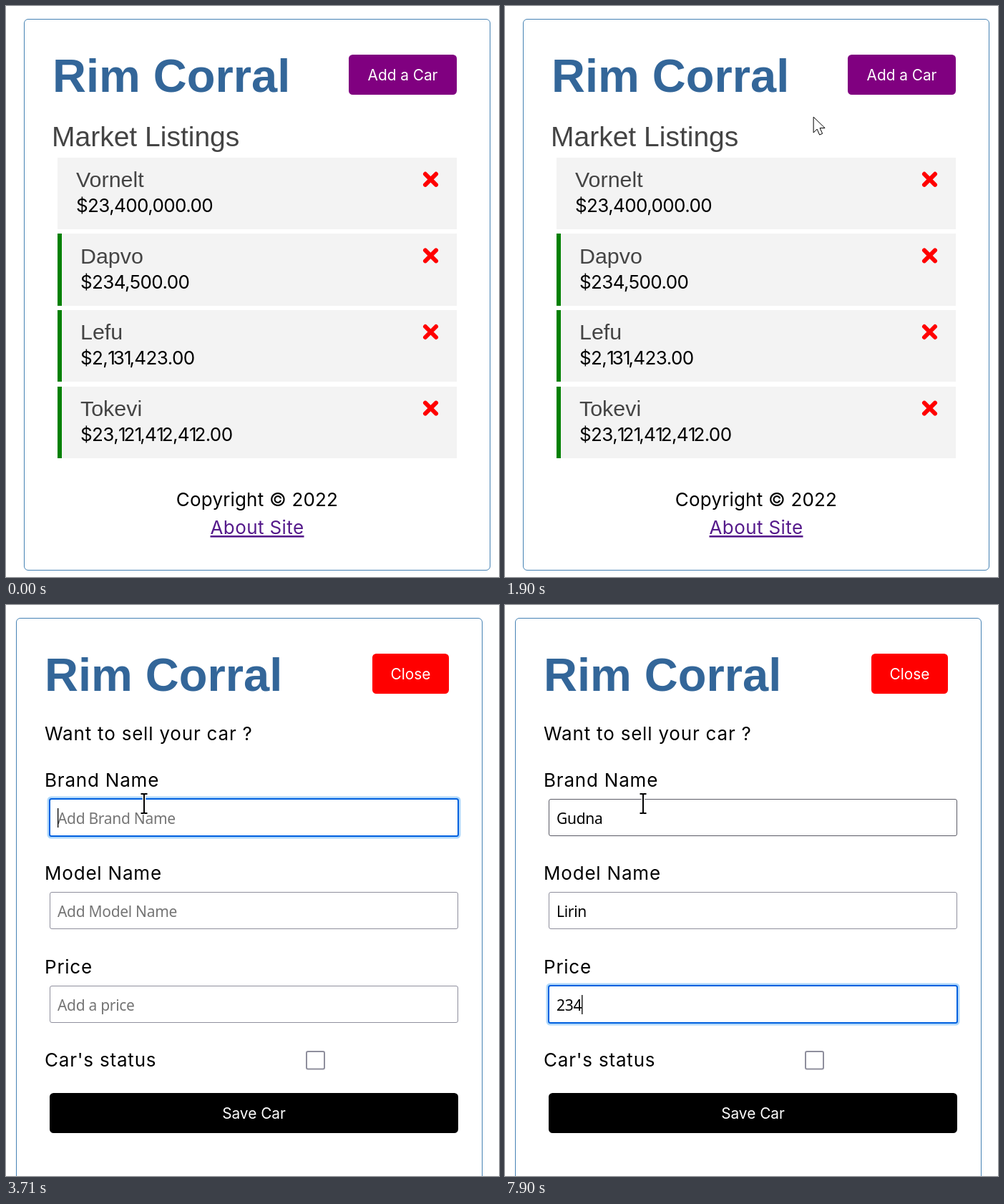
Animation of 689 by 798 pixels, one loop 8000 ms. Source, as an HTML page:

```html
<!DOCTYPE html>
<html lang="en">
<head>
<meta charset="utf-8">
<title>Car listings</title>
<style>
  html, body { margin: 0; width: 689px; height: 798px; overflow: hidden; background: #fff; }
  svg { display: block; }
  text { font: 26px Inter, sans-serif; letter-spacing: .2px; white-space: pre; }
  .title { font: bold 65px "Liberation Sans", sans-serif; fill: #336699; letter-spacing: 0; }
  .head { font: 39px "Liberation Sans", sans-serif; fill: #444; letter-spacing: 0; }
  .name { font: 30.42px "Liberation Sans", sans-serif; fill: #444; letter-spacing: 0; }
  .price { letter-spacing: -.6px; }
  .price .one { letter-spacing: -3.2px; }
  .label { letter-spacing: .8px; }
  .btn { font-size: 20.8px; fill: #fff; letter-spacing: 0; text-anchor: middle; }
  .mid { text-anchor: middle; }
  .link { fill: #551a8b; text-decoration: underline 1.5px; text-underline-offset: 2.5px; letter-spacing: .4px; }
  .value { font: 21px "Noto Sans", sans-serif; letter-spacing: -.3px; }
  .card { fill: none; stroke: #4682b4; }
  .row rect { shape-rendering: crispEdges; }
</style>
</head>
<body>
<svg id="stage" width="689" height="798" viewBox="0 0 689 798"></svg>
<script>
const LOOP = 8000, STEP = 1000 / 15;
const stage = document.getElementById('stage');

const text = (x, y, s, cls = '') => `<text x="${x}" y="${y}" class="${cls}">${s}</text>`;
const button = (x, y, w, color, label) =>
  `<rect x="${x}" y="${y}" width="${w}" height="56" rx="5.5" fill="${color}"/>` +
  text(x + w / 2, y + 35.5, label, 'btn');
const title = x => text(x, 119.5, 'Rim Corral', 'title');

const cars = [
  ['Vornelt', '$23,400,000.00', 0],
  ['Dapvo', '$234,500.00', 6],
  ['Lefu', '$2,131,423.00', 6],
  ['Tokevi', '$23,121,412,412.00', 6]
];
const narrowOnes = s => s.replace(/1/g, '<tspan class="one">1</tspan>');
const carRow = ([name, price, bar], i) => `<g class="row" transform="translate(72 ${211.8 + i * 106.6})">
  <rect width="558" height="100.3" fill="#f3f3f3"/>
  <rect width="${bar}" height="100.3" fill="green"/>
  ${text(26 + bar, 41.2, name, 'name')}${text(26 + bar, 76.2, narrowOnes(price), 'price')}
  <path d="M514 23l15 15m0-15l-15 15" stroke="red" stroke-width="6" stroke-linecap="round"/>
</g>`;

// keys: time at which each letter appears
const fields = [
  { y: 271, label: 'Brand Name', hint: 'Add Brand Name', word: 'Gudna', keys: [4570, 4640, 4700, 4770, 4970] },
  { y: 401, label: 'Model Name', hint: 'Add Model Name', word: 'Lirin', keys: [5770, 5970, 6110, 6170, 6320] },
  { y: 532, label: 'Price', hint: 'Add a price', word: '234', keys: [7640, 7770, 7900] }
];
const focusTimes = [3490, 5170, 6720, LOOP];
const caretOff = [[4100, 4500], [5640, 5770], [7250, 7640]];

const fieldBox = f => text(54, f.y - 17, f.label, 'label') + `<g class="field">
  <rect class="ring" x="59" y="${f.y - 2}" width="575" height="56" rx="4" fill="none" stroke="#b0d8fa" stroke-width="3"/>
  <rect class="box" fill="#fff"/>
  ${text(72, f.y + 34.5, '', 'value')}
  <rect class="caret" y="${f.y + 13}" width="1.3" height="27"/>
</g>`;

const pointers = {
  arrow: '<path d="M0 0V22l5-5 3.5 8 4-1.8L9 15.5h7z" fill="#fff" stroke="#000"/>',
  beam: ['#fff" stroke-width="4.5', '#000" stroke-width="2'].map(s =>
    `<path d="M-4.5-13.5h3.5l1 1 1-1h3.5M0-12.5v25M-4.5 13.5h3.5l1-1 1 1h3.5" fill="none" stroke="${s}"/>`).join(''),
  hand: '<path d="M-2.5 19V2.5a2.5 2.5 0 0 1 5 0V10q3.4-1 3.7 1.5 3.4-1 3.7 2 3 0 2.6 3V22q0 4-2.5 9H-.5q-2-5-8.5-11-2-3 .5-4.5t6 3.5z" fill="#fff" stroke="#000" stroke-linejoin="round"/>'
};

// time, x, y, pointer shape from then on
const path = [
  [800, 300, 515, 'arrow'], [930, 190, 330, 'arrow'], [1000, 128, 190, 'arrow'],
  [1066, 157, 125, 'beam'], [1133, 165, 110, 'beam'], [1333, 290, 118, 'beam'],
  [1530, 425, 135, 'arrow'], [1600, 428, 163, 'arrow'], [1730, 412, 166, 'arrow'],
  [1930, 440, 150, 'arrow'], [2130, 500, 115, 'hand'], [2260, 544, 97.5, 'hand'],
  [2990, 544, 97.5, 'hand'], [3060, 500, 127, 'arrow'], [3130, 430, 160, 'arrow'],
  [3195, 285, 228, 'arrow'], [3260, 196, 270, 'beam'], [3460, 196, 270, 'beam'],
  [3660, 193, 277.5, 'beam'], [LOOP, 193, 277.5, 'beam']
];

stage.innerHTML = `
<g id="list">
  <rect class="card" x="25.5" y="18.5" width="651" height="770" rx="5.5"/>
  ${title(65)}
  <g id="add">${button(479, 68, 151, 'purple', 'Add a Car')}</g>
  ${text(64, 196, 'Market Listings', 'head')}
  ${cars.map(carRow).join('')}
  ${text(351, 699, 'Copyright © 2022', 'mid')}
  ${text(351, 738, 'About Site', 'mid link')}
</g>
<g id="form">
  <rect class="card" x="14.5" y="18.5" width="651" height="820" rx="5.5"/>
  ${title(54)}
  ${button(512, 68, 107, 'red', 'Close')}
  ${text(54, 189, 'Want to sell your car ?', 'label')}
  ${fields.map(fieldBox).join('')}
  ${text(54, 645, "Car's status", 'label')}
  <rect x="420" y="624" width="25" height="24.5" rx="2" fill="#fff" stroke="#8f8f9d" stroke-width="2"/>
  ${button(61, 682, 571, '#000', 'Save Car')}
</g>
<g id="pointer">${Object.keys(pointers).map(k => `<g id="${k}">${pointers[k]}</g>`).join('')}</g>`;

const $ = id => document.getElementById(id);
const show = (el, on) => el.setAttribute('display', on ? 'inline' : 'none');
const set = (el, attrs) => { for (const k in attrs) el.setAttribute(k, attrs[k]); };
const fieldEls = [...document.querySelectorAll('.field')].map(g =>
  ['ring', 'box', 'value', 'caret'].map(c => g.querySelector('.' + c)));

function drawField(f, i, t) {
  const [ring, box, value, caret] = fieldEls[i];
  const focused = t >= focusTimes[i] && t < focusTimes[i + 1];
  const typed = f.word.slice(0, f.keys.filter(k => t >= k).length);
  const hovered = i === 0 && t >= 3260;
  show(ring, focused);
  const inset = focused ? 0 : .5;
  set(box, {
    x: 61 + inset, y: f.y + inset, width: 571 - 2 * inset, height: 52 - 2 * inset, rx: 2.5,
    stroke: focused ? '#0060df' : hovered ? '#5b5b66' : '#8f8f9d',
    'stroke-width': focused ? 2 : 1
  });
  value.textContent = typed || f.hint;
  set(value, { fill: typed ? '#000' : '#757575' });
  show(caret, focused && !caretOff.some(([a, b]) => t >= a && t < b));
  set(caret, { x: 72 + (typed ? value.getComputedTextLength() : 0) });
}

function drawPointer(t) {
  const q = Math.floor((t + 5) / STEP) * STEP;
  show($('pointer'), t >= 800);
  const i = Math.max(1, path.findIndex(p => p[0] > q));
  const [t0, x0, y0, shape] = path[i - 1], [t1, x1, y1] = path[i];
  const k = Math.max(0, (q - t0) / (t1 - t0));
  set($('pointer'), { transform: `translate(${x0 + (x1 - x0) * k} ${y0 + (y1 - y0) * k})` });
  for (const name in pointers) show($(name), name === shape);
}

function draw(t) {
  const formOpen = t >= 2760;
  show($('list'), !formOpen);
  show($('form'), formOpen);
  const s = t < 2560 ? 1 : t < 2690 ? .99 : .98;
  set($('add'), { transform: `translate(555 96.5) scale(${s}) translate(-554.5 -96)`.replace(/^.*scale\(1\).*$/, '') });
  fields.forEach((f, i) => drawField(f, i, t));
  drawPointer(t);
}

const start = performance.now();
function tick() {
  draw((performance.now() - start) % LOOP);
  requestAnimationFrame(tick);
}
tick();
</script>
</body>
</html>
```
